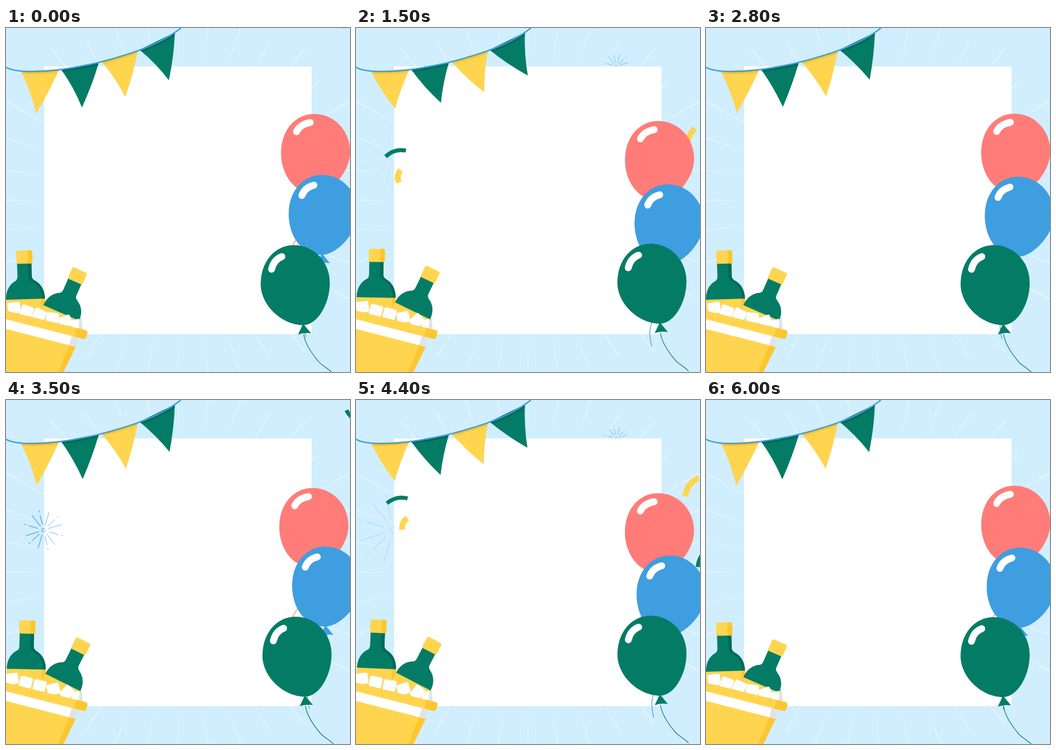
These frames come from a looping animation (600 px wide and 600 px high, 6100 ms). An HTML page with a canvas:

```html
<!DOCTYPE html>
<html lang="en">
<head>
<meta charset="utf-8">
<title>Party frame</title>
<style>
html, body { margin: 0; width: 100%; height: 100%; overflow: hidden; background: #d0eefd; }
canvas { display: block; width: 600px; height: 600px; }
</style>
</head>
<body>
<canvas id="stage" width="600" height="600"></canvas>
<script>
const ctx = document.getElementById('stage').getContext('2d');
const LOOP = 6100, PERIOD = 3.07, FPS = 15;
const SKY = '#d0eefd', YELLOW = '#ffd54f', AMBER = '#fcc62f', GREEN = '#047c65',
  PINE = '#016a56', RED = '#ff7c78', BLUE = '#3e9ee0', GREY = '#e1e3e5';
const BOX = [66.5, 67, 466.5, 467];
const rad = deg => deg * Math.PI / 180;
const mix = (a, b, k) => a + (b - a) * k;
const ramp = (a, b, t) => Math.min(1, Math.max(0, (t - a) / (b - a)));

// Cosine with slightly flattened ends, peaking at the given phase.
function swing(p, peak) {
  const c = Math.cos((p - peak) * 2 * Math.PI / PERIOD);
  return 1.15 * c - 0.15 * c ** 3;
}

function fill(d, color) {
  ctx.fillStyle = color;
  ctx.fill(new Path2D(d));
}

function line(d, color, width, cap = 'butt') {
  ctx.strokeStyle = color;
  ctx.lineWidth = width;
  ctx.lineCap = cap;
  ctx.stroke(new Path2D(d));
}

function block(x, y, w, h, radii, color) {
  ctx.beginPath();
  ctx.roundRect(x, y, w, h, radii);
  ctx.fillStyle = color;
  ctx.fill();
}

function placed(x, y, deg, draw) {
  ctx.save();
  ctx.translate(x, y);
  ctx.rotate(rad(deg));
  draw();
  ctx.restore();
}

function background() {
  ctx.fillStyle = SKY;
  ctx.fillRect(0, 0, 600, 600);
  for (let i = 0; i < 36; i++) {
    placed(300, 300.5, i * 10, () =>
      fill(`M${i % 2 ? 236 : 244} 0L${i % 2 ? 345 : 318} -1.3V1.3Z`, '#e4f5fe'));
  }
  ctx.fillStyle = '#fff';
  ctx.fillRect(...BOX);
}

// Twelve rays around a ring, every other one broken into dashes.
function burstPath(x, y, size) {
  const path = new Path2D();
  path.arc(x, y, 5 * size, 0, 7);
  for (let i = 0; i < 12; i++) {
    const dashed = i % 2;
    const a = rad(-13 - 30 * i + (dashed ? 0 : (i % 6 - 2) * 2.3));
    for (const [from, to] of dashed ? [[17, 46], [54, 60]] : [[14, 55]]) {
      path.moveTo(x + Math.cos(a) * from * size, y + Math.sin(a) * from * size);
      path.lineTo(x + Math.cos(a) * to * size, y + Math.sin(a) * to * size);
    }
  }
  return path;
}

function burst(x, y, age, scale, alpha) {
  if (alpha <= 0 || age <= 0) return;
  const path = burstPath(x, y, scale * (1 - Math.exp(-age / .33)));
  const paint = (width, opacity) => {
    ctx.strokeStyle = BLUE;
    ctx.lineWidth = width;
    ctx.globalAlpha = opacity;
    ctx.stroke(path);
  };
  const outside = new Path2D();
  outside.rect(0, 0, 600, 600);
  outside.rect(...BOX);
  ctx.save();
  ctx.clip(outside, 'evenodd');
  paint(1.6, alpha * .7);
  ctx.restore();
  // Faint strokes vanish over the white panel.
  if (alpha > .5) {
    ctx.save();
    ctx.beginPath();
    ctx.rect(...BOX);
    ctx.clip();
    paint(.8, .9);
    ctx.restore();
  }
}

// Falling with drag: slow at first, then nearly steady.
const fall = p => 350 * (p - .6 * (1 - Math.exp(-p / .6)));

// Position and angle at phase .8, then sideways speed, its change, and spin.
const CONFETTI = [
  { color: GREEN, x: 614, y: 120, len: 40, angle: -107, vx: 0, ax: -35, spin: 94 },
  { color: YELLOW, x: 545, y: 57, len: 40, angle: 43, vx: -18, ax: 0, spin: -130 },
  { color: YELLOW, x: 559, y: -3, len: 40, angle: 20, vx: 90, ax: -83, spin: -140 },
  { color: BLUE, x: 477, y: 38, len: 25, angle: 207, vx: 110, ax: -60, spin: 50 },
  { color: YELLOW, x: 14, y: 57, len: 29, angle: 50, vx: -60, ax: 0, spin: -60 },
  { color: GREEN, x: 88, y: 20, len: 37, angle: 0, vx: -40, ax: 16, spin: -25 },
  { color: YELLOW, x: 123, y: 62, len: 22, angle: 0, vx: -85, ax: 16, spin: -124 }
];

function confetti(p) {
  const q = p - .8;
  for (const c of CONFETTI) {
    const x = c.x + c.vx * q + c.ax * q * q;
    placed(x, c.y + fall(p) - fall(.8), c.angle + c.spin * q, () =>
      line(`M${-c.len / 2} 3Q0 ${-c.len * .18} ${c.len / 2} 3`, c.color, c.color === GREEN ? 7 : 10));
  }
}

// x, y are the left and top of the balloon; low is where its foot sits.
function balloon(x, y, color, low, thread, shine) {
  placed(x, y, 0, () => {
    line(thread, color, 1.2);
    fill(`M${low} 137L${low - 9} 156Q${low + 2} 152 ${low + 14} 154Z`, color);
    fill(`M58 0C92 0 120.500 28 120.500 66C120.500 102 ${low + 25} 139.500 ${low} 139.500` +
      `C${low - 37} 139.500 0 105 0 68C0 28 25 0 58 0Z`, color);
    line(shine, '#fff', 12, 'round');
  });
}

function balloons(p) {
  const r = swing(p, -.2), g = swing(p, -.17);
  balloon(474.5 + 5.5 * r, 156 - 6.5 * r, RED, 60,
    'M58 145Q48 188 35 205L18 233', 'M27 31Q33 18 51 15');
  balloon(488.6 + 11 * swing(p, .59), 264.8 - 9.5 * swing(p, .24), BLUE, 58,
    'M61 150C60 195 22 235 27 265Q28 275 30 283', 'M23 36Q28 22 44 18');
  balloon(450 - 6 * g, 377.5 + 1.3 * g, GREEN, 74,
    'M75 155C77 172 90 190 100 202C105 209 115 213 124 222', 'M19 42Q23 25 37 20');
}

function bottle(x, y, deg, tall, shaded) {
  placed(x, y, deg, () => {
    ctx.scale(1, tall);
    fill('M-34 -1H34V45H-34Z', YELLOW);
    fill('M-34 0C-34 -18 -25 -28 -17 -32Q-13 -34 -13 -40V-64H12V-40Q12 -35 17 -32C26 -27 34 -17 34 0Z', GREEN);
    block(-14, -85, 28, 23, 3, YELLOW);
    if (shaded) {
      fill('M6 -62H12V-40Q12 -35 17 -32C26 -27 34 -17 34 0H29C29 -16 22 -25 13 -30Q6 -34 6 -40Z', PINE);
      fill('M28 0H34V45H28Z', AMBER);
      block(6, -85, 8, 23, [0, 3, 3, 0], AMBER);
    }
  });
}

function ice(slide) {
  for (let i = 0; i < 5; i++) {
    const x = 14 + 22.3 * i + (i - 2) * 2 * slide;
    const angle = 28 * Math.sin(i * 1.05 - .25) - 8 * i * slide;
    placed(x, 488 + 6 * i - 2 * slide, angle, () => {
      block(-11, -9.5, 22, 19, 3, '#fff');
      ctx.strokeStyle = '#eceae2';
      ctx.lineWidth = .8;
      ctx.stroke();
    });
  }
}

function bucket(p) {
  const d = Math.min(1, Math.abs(p - .91) / .95);
  const lift = (1 + Math.cos(Math.PI * d)) / 2;
  fill('M0 485L60 492L132 507L133 530L0 510Z', YELLOW);
  fill('M112 507L132 506L134 530L108 526Z', GREY);
  bottle(34 + 3 * lift, 473 - 8 * lift, -1.6 + 7 * lift, 1, true);
  bottle(96.5 + 6 * lift, 497 - 10 * lift, 23.5 + 6.5 * lift, .96, false);
  ice(Math.min(1, lift * 2));
  fill('M114 510L128 507L127 526L114 524Z', '#fff');
  fill('M0 522L122 555L100 600H0Z', YELLOW);
  fill('M111 551L122 555L100 600H91Z', AMBER);
  fill('M0 506L126 539L121 556L0 525Z', '#fff');
  fill('M115 536L126 540L121 556L110 553Z', GREY);
  fill('M0 493L139 527Q143 529 142 532L139.500 540Q138 543 134 542L0 508Z', YELLOW);
  fill('M123 523L139 527Q143 529 142 532L139.500 540Q138 543 134 542L119 538Z', AMBER);
}

const ROPE = 'M-2 67C10 77 50 78.500 95 72.500C170 62.500 260 36.500 305 0';

// A pennant between two rope points, its tip swept sideways by s.
function pennant(ax, ay, bx, by, x, y, s, color, shade) {
  const flag = new Path2D(`M${ax} ${ay}Q${(ax + x) / 2} ${(ay + y) / 2} ${x - 8 * s} ${y + 4.2 * s}` +
    `Q${(bx + x) / 2} ${(by + y) / 2} ${bx} ${by}Z`);
  ctx.save();
  ctx.fillStyle = color;
  ctx.fill(flag);
  ctx.clip(flag);
  line(ROPE, shade, 9);
  ctx.restore();
}

function bunting(p) {
  const s = swing(p, .08);
  pennant(26, 75, 93, 72, 60.5, 145, s, YELLOW, AMBER);
  pennant(96, 72, 162, 60, 140.5, 134.5, s, GREEN, PINE);
  pennant(166, 58, 230, 39, 216, 116, s, YELLOW, AMBER);
  pennant(233, 38, 294.5, 8, 292, 87, s, GREEN, PINE);
  line(ROPE, BLUE, 2.4);
}

function render(time) {
  const p = time % PERIOD;
  background();
  burst(65.5, 227, p - .15, 1.12, 1 - ramp(.85, 1.5, p));
  burst(454, 67, p - .75, .45, .5 - .5 * ramp(1.5, 1.95, p));
  confetti(p);
  balloons(p);
  bucket(p);
  bunting(p);
}

// Steps fall on a 50 ms grid at fifteen pictures per second.
const start = performance.now();
let shown = -1;
function tick() {
  const ms = Math.max(0, performance.now() - start) % LOOP;
  const step = Math.floor(Math.floor(ms / 50) * 50 * FPS / 1000);
  if (step !== shown) {
    shown = step;
    render(step / FPS);
  }
  requestAnimationFrame(tick);
}
tick();
</script>
</body>
</html>
```
